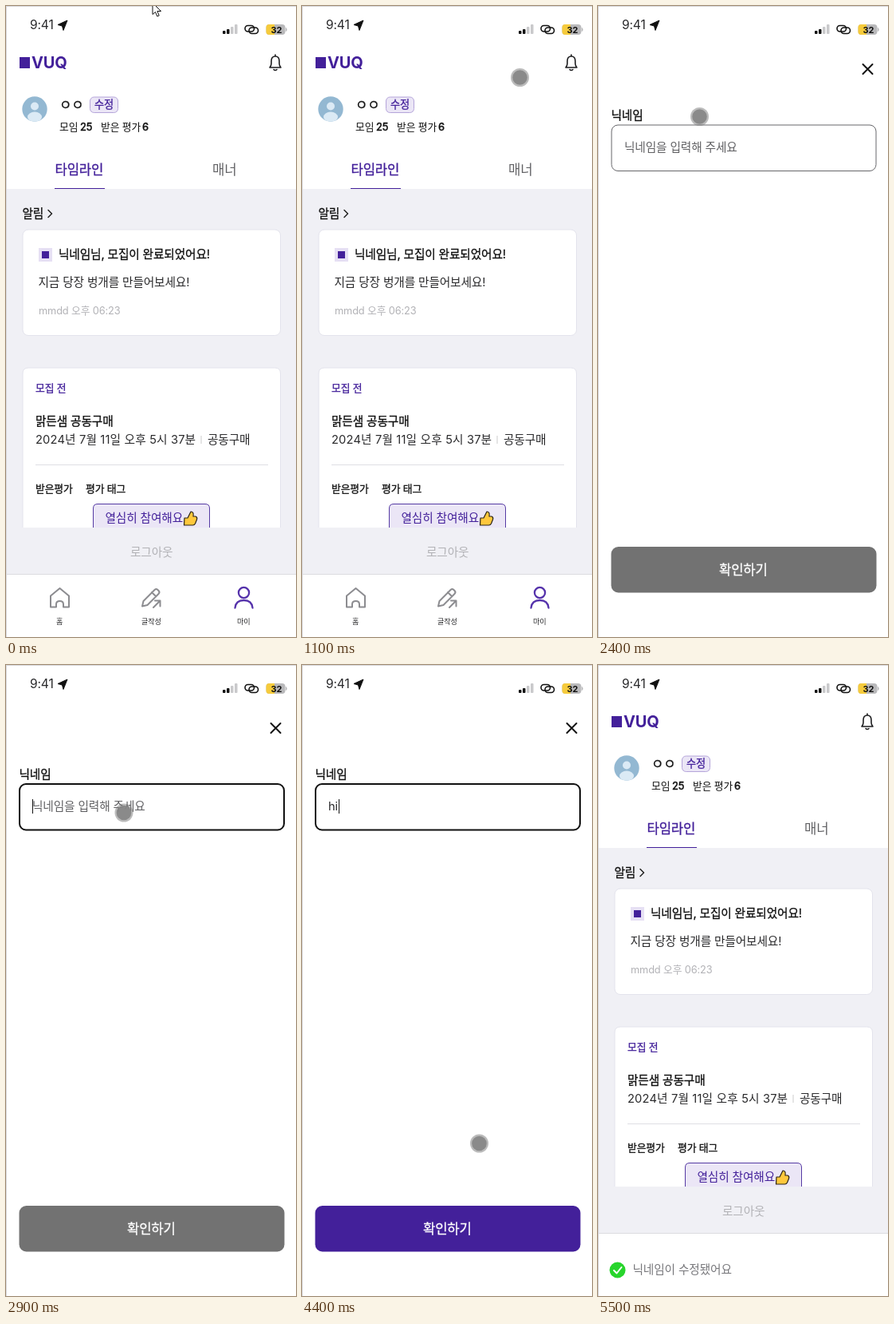
These frames come from a looping animation (364x790 px, 5.8 s). An HTML page:

```html
<!DOCTYPE html>
<html lang="ko">
<head>
<meta charset="utf-8">
<style>
  html, body { margin: 0; width: 100%; height: 100%; overflow: hidden; background: #fff; }
  svg { display: block; width: 364px; height: 790px; --purple: #43209a; }
  text { font: 14.7px Inter, "Noto Sans CJK KR", "Noto Sans CJK", sans-serif; letter-spacing: -.01em; fill: var(--c, #2a2a2c); transform: translateY(-.5px); }
  .ink { --c: #111; }
  .purple { --c: var(--purple); }
  .grey { --c: #b2b2b6; }
  .mid { --c: #606063; }
  .m { stroke: var(--c, #2a2a2c); stroke-width: .3px; }
  .small { font-size: 12.8px; }
  .big { font-size: 16.7px; }
  .tiny { font-size: 9.1px; }
  .mixed { letter-spacing: .01em; }
  .line { fill: none; stroke-linecap: round; stroke-linejoin: round; }
</style>
</head>
<body>
<svg viewBox="0 0 364 790">
  <rect width="364" height="790" fill="#fff"/>

  <g id="profile">
    <rect x="17" y="64" width="13" height="14" fill="var(--purple)"/>
    <text class="purple" x="32" y="78" style="font-size:20px;font-weight:700">VUQ</text>
    <path class="line" d="M331 77h14q-2-2-2-5v-3q0-6-5-6t-5 6v3q0 3-2 5zM336 79.5q2 2 4 0M338 61v2" stroke="#1d1d1f" stroke-width="1.6"/>

    <clipPath id="face"><circle cx="36" cy="129" r="15.7"/></clipPath>
    <g clip-path="url(#face)">
      <rect x="20" y="113" width="32" height="32" fill="#93b8d2"/>
      <circle cx="36" cy="125.5" r="5" fill="#dbeaf5"/>
      <ellipse cx="36" cy="139" rx="9" ry="6.5" fill="#dbeaf5"/>
    </g>
    <text class="ink m big" x="67" y="130">ㅇㅇ</text>
    <rect x="105.5" y="114" width="35" height="19.5" rx="5" fill="#ebe6f6" stroke="#b5a5da"/>
    <text class="purple m" x="111" y="128.500" style="font-size:13.2px">수정</text>
    <text class="small ink" x="67" y="156">모임</text>
    <text class="small ink m" x="93" y="156" style="font-weight:500">25</text>
    <text class="small ink" x="119" y="156">받은 평가</text>
    <text class="small ink m" x="171" y="156" style="font-weight:500">6</text>

    <text class="purple m big" x="61.5" y="211">타임라인</text>
    <text class="mid big" x="259" y="211">매너</text>
    <rect x="1" y="229" width="363" height="482" fill="#f0f0f5"/>
    <rect x="61" y="228" width="63" height="1" fill="var(--purple)"/>

    <text class="ink m" x="20.5" y="265">알림</text>
    <path class="line" d="M53 255.5l4.5 4.5-4.5 4.5" stroke="#222" stroke-width="1.5"/>

    <g fill="#fff" stroke="#e3e3ec">
      <rect x="21" y="280" width="323.5" height="132.5" rx="7"/>
      <path d="M21 653V460q0-7 7-7h309.500q7 0 7 7v193"/>
    </g>
    <rect x="41" y="303" width="17" height="17" fill="#e6e0f4"/>
    <rect x="45" y="307" width="9" height="9" fill="var(--purple)"/>
    <text class="ink m" x="66" y="316">닉네임님, 모집이 완료되었어요!</text>
    <text x="40.5" y="351">지금 당장 벙개를 만들어보세요!</text>
    <text class="grey small" x="41" y="386">mmdd 오후 06:23</text>

    <text class="purple m small" x="37" y="483">모집 전</text>
    <text class="ink m" x="37" y="525">맑든샘 공동구매</text>
    <text class="mixed" x="37" y="548">2024년 7월 11일 오후 5시 37분</text>
    <path d="M245 538v10" stroke="#ccc"/>
    <text x="253" y="548">공동구매</text>
    <path d="M37 574.5h292" stroke="#dedee4"/>
    <text class="ink m small" x="37" y="609">받은평가</text>
    <text class="ink m small" x="100" y="609">평가 태그</text>
    <path d="M109.5 654v-25q0-5.5 5.5-5.5h135q5.500 0 5.500 5.500v25" fill="#ebe6f6" stroke="#553aa3"/>
    <text class="purple" x="124.5" y="646">열심히 참여해요</text>
    <path class="line" d="M224 641h4l4-8q4 0 3 6h3q2.500 1 1.500 4l-2 5q-1 2-3 2h-11z" style="fill:#ffc83d" stroke="#2b2418" stroke-width="1.2"/>
    <rect x="1" y="653" width="363" height="58" fill="#f0f0f5"/>
    <text class="grey" x="156" y="689">로그아웃</text>

    <path d="M1 711.5h363" stroke="#dcdce0"/>
    <g class="line" stroke="#8c8c90" stroke-width="2">
      <path d="M56 738.5l11.5-9.5 11.5 9.5v14h-7v-3.500q0-4-4.500-4t-4.500 4v3.500h-7z"/>
      <path d="M171 751.500l1.500-6.500 14-14q2-2 4 0l1 1q2 2 0 4l-14 14zM183 734l5 5M187 744.500h6.500v7M193 745l-8 8"/>
      <g stroke="#5532ab" stroke-width="2.3">
        <circle cx="298.500" cy="734.500" r="6.600"/>
        <path d="M287.500 753.500q1-9.500 11-9.500t11 9.500"/>
      </g>
    </g>
    <text class="tiny" x="63" y="774">홈</text>
    <text class="tiny" x="170" y="774">글작성</text>
    <text class="tiny" x="290" y="774">마이</text>

    <g id="toast">
      <rect x="1" y="713" width="363" height="77" fill="#fff"/>
      <circle cx="24.5" cy="757.5" r="10" fill="#28d52c"/>
      <path id="check" class="line" d="M20 758l3.500 3.500 6-7.500" stroke="#fff" stroke-width="2"/>
      <text x="43.5" y="762" style="--c:#77777b">닉네임이 수정됐어요</text>
    </g>
  </g>

  <g id="edit">
    <path class="line" d="M332.5 73l12 12m0-12l-12 12" stroke="#111" stroke-width="2"/>
    <text class="ink m" x="16.5" y="142">닉네임</text>
    <rect id="field" x="17" y="149" width="332" height="57.5" rx="8" fill="#fff"/>
    <text id="hint" class="mid" x="33" y="182">닉네임을 입력해 주세요</text>
    <text id="typed" x="33" y="182"></text>
    <path id="caret" d="M0 168v18" stroke="#111"/>
    <text id="error" x="16.5" y="231" style="--c:#dc3a55">2글자 이상 입력해주세요</text>
    <rect id="button" x="16.5" y="677" width="333" height="57.5" rx="9"/>
    <text class="m big" x="152" y="712" style="--c:#fff">확인하기</text>
  </g>

  <g id="status">
    <text x="30" y="29.500" style="font-size:15.6px">9:41</text>
    <path d="M77 18l-12 5.500 5.500 1.500 1.500 5.500z" fill="#111" stroke="#111" stroke-linejoin="round"/>
    <g fill="#111">
      <rect x="272" y="31" width="3.5" height="4" rx="1"/>
      <rect x="277" y="29" width="3.5" height="6" rx="1"/>
      <rect x="282" y="26" width="3.5" height="9" rx="1" fill="#c9c9cb"/>
      <rect x="287" y="23" width="3.5" height="12" rx="1" fill="#c9c9cb"/>
    </g>
    <g class="line" stroke="#111" stroke-width="1.6">
      <rect x="300" y="24.5" width="11.5" height="7.5" rx="3.7"/>
      <rect x="305" y="27" width="11.5" height="7.5" rx="3.7"/>
    </g>
    <rect x="326.5" y="23" width="24" height="13" rx="4" fill="#b9b9bb"/>
    <path d="M337 23h-6.500q-4 0-4 4v5q0 4 4 4h6.500z" fill="#f6cb3c"/>
    <path d="M351.5 27.500q1.500 2 0 4z" fill="#b9b9bb" stroke="#b9b9bb"/>
    <text class="ink" x="332.5" y="34" style="font-size:11px;font-weight:700;letter-spacing:0">32</text>
  </g>

  <path d="M0 .5h364M.5 0v790" stroke="#d9d9dc"/>
  <path id="arrow" d="M184-4v14.500l3.500-3 2.300 5.500 2.400-1-2.300-5.500h4.600z" fill="#fff" stroke="#111"/>
  <g id="touch">
    <circle r="11.5" fill="#777" opacity=".5"/>
    <circle r="9.3" fill="#858585" opacity=".9"/>
  </g>
</svg>
<script>
const LOOP = 5800, STEP = 100;
const $ = id => document.getElementById(id);
const show = (id, on) => $(id).style.display = on ? "" : "none";

// Pointer path: time, x, y
const path = [
  [100, 196, 12], [600, 256, 60], [1100, 273.5, 89.5], [1300, 272, 92],
  [1800, 206, 146], [1900, 190.5, 145], [2100, 126, 126], [2200, 124, 126],
  [2400, 127.5, 138.5], [2900, 148, 185], [3900, 148, 185], [4000, 152.5, 195],
  [4500, 240, 700], [4800, 249.5, 719.5], [4900, 262, 724], [5200, 380, 745]
];

function pointAt(t) {
  const i = path.findIndex(p => p[0] > t);
  const [t0, x0, y0] = path[i - 1], [t1, x1, y1] = path[i];
  const k = (t - t0) / (t1 - t0);
  return [x0 + (x1 - x0) * k, y0 + (y1 - y0) * k];
}

function render(t) {
  const editing = t >= 2200 && t < 4700;
  const focused = t >= 2900;
  const name = t < 3800 ? "" : t < 4100 ? "h" : "hi";
  const valid = name.length > 1;

  show("profile", !editing);
  show("edit", editing);

  $("field").setAttribute("stroke", focused ? "#111" : "#66666a");
  $("field").setAttribute("stroke-width", focused ? 2 : 1);
  $("button").setAttribute("fill", valid ? "#43209a" : "#727272");
  $("typed").textContent = name;
  show("hint", !name);
  show("error", name && !valid);
  show("caret", focused && (t < 3400 || name));
  $("caret").setAttribute("transform", `translate(${[33.5, 42.5, 46.5][name.length]})`);

  show("toast", t >= 5200);
  $("toast").style.opacity = t < 5300 ? .5 : 1;
  show("check", t >= 5500);

  const touching = t >= 100 && t < 5200;
  show("arrow", t < 100);
  show("touch", touching);
  if (touching) $("touch").setAttribute("transform", `translate(${pointAt(t)})`);
}

function tick() {
  const t = performance.now() % LOOP;
  render(Math.floor(t / STEP) * STEP);
  requestAnimationFrame(tick);
}
tick();
</script>
</body>
</html>
```
